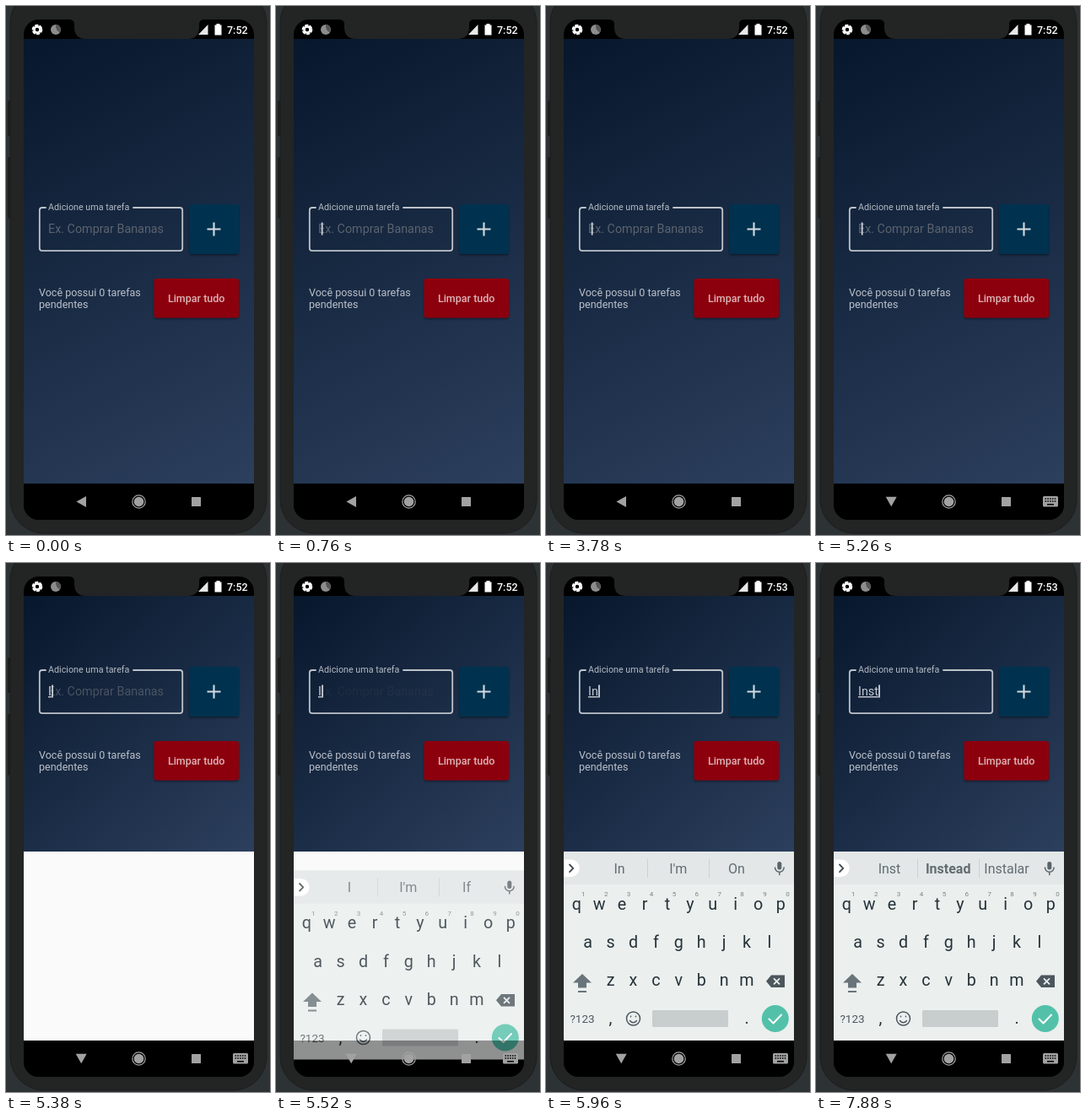
Write an HTML page that moves like this. It is 313 px wide and 627 px high and loops after 8 s.

```html
<!DOCTYPE html>
<html lang="pt">
<head>
<meta charset="utf-8">
<title>Lista de tarefas</title>
<style>
  html, body { margin: 0; width: 100%; height: 100%; overflow: hidden; background: #2d3234; }
  svg { display: block; width: 313px; height: 627px; font-family: Roboto, sans-serif; }
  .mid { text-anchor: middle; }
  .body { font-size: 12.54px; fill: #bbc0ca; }
  .field { font-size: 14.33px; }
  .key { font-size: 19.7px; fill: #253238; }
  .digit { font-size: 8px; fill: #78838a; }
  .suggestion { font-size: 16px; fill: #626c71; }
  .line { fill: none; stroke-linecap: round; stroke-linejoin: round; }
</style>
</head>
<body>
<svg viewBox="0 0 313 627">
  <defs>
    <linearGradient id="sky" gradientUnits="userSpaceOnUse" x1="21" y1="39" x2="294" y2="566">
      <stop stop-color="#07172c"/><stop offset="1" stop-color="#2c3f5d"/>
    </linearGradient>
    <clipPath id="screen"><rect x="21" y="16" width="273" height="593" rx="18"/></clipPath>
    <filter id="shadow" x="-10%" y="-10%" width="120%" height="130%">
      <feDropShadow dx="0" dy="1.5" stdDeviation="1.3" flood-opacity=".45"/>
    </filter>
  </defs>

  <!-- phone -->
  <g fill="#1d1f1f">
    <rect x="2" y="112" width="5" height="42" rx="2"/>
    <rect x="2" y="179" width="5" height="73" rx="2"/>
  </g>
  <rect x="5" y="-20" width="304" height="645" rx="40" fill="#232424" stroke="#1c1d1d"/>
  <rect x="21" y="16" width="273" height="593" rx="18"/>

  <g clip-path="url(#screen)">
    <rect x="21" y="39" width="273" height="527" fill="#fafafa"/>
    <rect id="page" x="21" y="39" width="273" height="527" fill="url(#sky)"/>

    <g id="form">
      <path class="line" d="M47 239H43a3.2 3.2 0 0 0-3.2 3.2V287a3.2 3.2 0 0 0 3.2 3.2H206a3.2 3.2 0 0 0 3.2-3.2V242.200a3.2 3.2 0 0 0-3.2-3.2H151" stroke="#bec3ca" stroke-width="1.8" stroke-linecap="butt"/>
      <text x="50" y="242" font-size="10.75" fill="#b6bbc4">Adicione uma tarefa</text>
      <text id="hint" class="field" x="50" y="269" fill="#5c636e">Ex. Comprar Bananas</text>
      <text id="typed" class="field" x="50" y="269" fill="#c4c9d1" text-decoration="underline"></text>
      <rect id="cursor" y="256.500" width="1.7" height="15" fill="#d5d9df"/>
      <rect x="217" y="235" width="59" height="59" rx="3" fill="#003350" filter="url(#shadow)"/>
      <path d="M238.500 264.500h16M246.500 256.500v16" stroke="#d3dae0" stroke-width="2.100"/>
      <text class="body" x="39" y="343.700">Você possui 0 tarefas</text>
      <text class="body" x="39" y="358.200">pendentes</text>
      <rect x="175.500" y="323" width="100.500" height="46.500" rx="3" fill="#8c000f" filter="url(#shadow)"/>
      <text class="body mid" x="225.700" y="351" font-weight="500" style="fill:#dcb4b9">Limpar tudo</text>
    </g>

    <rect x="21" y="566" width="273" height="43"/>

    <g id="keyboard">
      <rect x="21" y="342" width="273" height="224" fill="#ebefee"/>
      <rect x="21" y="342" width="273" height="39" fill="#e3e7e7"/>
      <path d="M120.500 351v22M193.500 351v22" stroke="#cbd1d2"/>
      <path d="M21 351.500h8.500a10.200 10.200 0 0 1 0 20.400H21z" fill="#fff"/>
      <path class="line" d="M28 357.500l4.200 4.300-4.200 4.300" stroke="#3c474c" stroke-width="1.800"/>
      <g id="suggestions"></g>
      <rect x="274.300" y="354" width="5" height="9.500" rx="2.500" fill="#59646a"/>
      <path class="line" d="M271.500 361a5.300 5.300 0 0 0 10.600 0M276.800 366.500v3" stroke="#59646a" stroke-width="1.500"/>
      <g id="keys"></g>
      <path d="M43 487l11 10.500h-6v6H38v-6h-6zM38 507h10v2H38z" fill="#68747a"/>
      <path d="M267 488.500h16v14.500h-16l-6-7.200z" fill="#4b575d"/>
      <path d="M270 492.300l7 7m0-7l-7 7" stroke="#ebefee" stroke-width="1.700"/>
      <text class="mid" x="43" y="545" font-size="13.500" fill="#4b575d">?123</text>
      <text class="key mid" x="76.500" y="546">,</text>
      <text class="key mid" x="238" y="546">.</text>
      <g class="line" stroke="#4b575d" stroke-width="1.500">
        <circle cx="103.500" cy="540" r="8"/>
        <path d="M99.500 542.500q4 4.500 8 0M100.500 537.300v.4M106.500 537.300v.4"/>
      </g>
      <rect x="126" y="530" width="90" height="20" rx="1.500" fill="#c8cdcd"/>
      <circle cx="271.800" cy="540" r="16" fill="#53c1aa"/>
      <path class="line" d="M264.500 540.500l5 5 9.500-10" stroke="#fff" stroke-width="2"/>
    </g>
    <rect x="21" y="566" width="273" height="43" opacity=".24"/>

    <!-- navigation bar -->
    <g fill="#a2a2a2">
      <path id="back" d="M83.500 587.500l11.500-6.500v13z"/>
      <circle cx="157.500" cy="587.500" r="5.800"/>
      <circle class="line" cx="157.500" cy="587.500" r="7.700" stroke="#a2a2a2" stroke-width="1.200"/>
      <rect x="220" y="582" width="11" height="11" rx=".6"/>
      <g id="switcher">
        <rect x="269" y="581" width="18" height="12.500" rx="1.500"/>
        <path d="M271.500 584h13M271.500 587h13" stroke="#000" stroke-width="1.500" stroke-dasharray="1.600 1.200"/>
        <path d="M274 590.700h8" stroke="#000" stroke-width="1.500"/>
      </g>
    </g>

    <!-- status bar -->
    <circle class="line" cx="37" cy="28" r="5.300" stroke="#fff" stroke-width="2" stroke-dasharray="2.700 2.850"/>
    <circle class="line" cx="37" cy="28" r="3.500" stroke="#fff" stroke-width="2.600"/>
    <circle cx="59" cy="28" r="6" fill="#8d8d8d"/>
    <path d="M59 22a6 6 0 0 1 5 9.300q-5.500-2-5-9.300z" fill="#555"/>
    <path d="M239.500 22v12H228z" fill="#e8e8e8"/>
    <path d="M247.500 22.500h2V21h4v1.500h2V34.500h-8z" fill="#fff"/>
    <text id="clock" x="262" y="32.700" font-size="12.540" font-weight="500" fill="#fff"></text>
  </g>
  <path d="M76 15h158v1q-5 1-5 5v4q0 14-14 14H95q-14 0-14-14v-4q0-4-5-5z" fill="#232424"/>
</svg>

<script>
const LOOP = 8000;
const RESIZE = 5380;
const SVG_NS = 'http://www.w3.org/2000/svg';
const $ = id => document.getElementById(id);

const clockSteps = [[0, '7:52'], [5840, '7:53']];
const typedSteps = [[0, ''], [RESIZE, 'I'], [5900, 'In'], [7140, 'Ins'], [7880, 'Inst']];
const suggestionSteps = [
  [0, ['I', "I'm", 'If']],
  [5940, ['In', "I'm", 'On']],
  [7160, ['Ins', 'Inside', 'Instant']],
  [7720, ['Inst', 'Instead', 'Instalar']]
];
const cursorSteps = [[0, 0], [760, 1], [2340, 0], [3780, 1], [4500, 0], [5220, 1]];
const hintSteps = [[0, 1], [RESIZE, .75], [5420, .55], [5470, .35], [5520, .15], [5540, .08], [5680, 0]];
const backSteps = [[0, 0], [5220, -45], [5260, -90]];
const switcherSteps = [[0, 0], [5220, .5], [5260, 1]];
const liftSteps = [[0, 60], [5420, 42], [5470, 31], [5520, 22.5], [5540, 13], [5680, 7], [5720, 3], [5760, 0]];
const fadeSteps = [[0, 0], [5400, .12], [5420, .35], [5470, .6], [5520, .8], [5540, .9], [5680, .96], [5720, 1]];

// Value of the last step that has begun.
function at(steps, t) {
  let value = steps[0][1];
  for (const [start, next] of steps) if (t >= start) value = next;
  return value;
}

function addText(parent, className, x, y, content = '') {
  const node = document.createElementNS(SVG_NS, 'text');
  node.setAttribute('class', className + ' mid');
  node.setAttribute('x', x);
  node.setAttribute('y', y);
  node.textContent = content;
  parent.append(node);
  return node;
}

const rows = [['qwertyuiop', 36.3, 410.7], ['asdfghjkl', 49.7, 456], ['zxcvbnm', 76.6, 501.3]];
for (const [letters, left, y] of rows)
  [...letters].forEach((letter, i) => addText($('keys'), 'key', left + i * 26.9, y, letter));
for (let i = 0; i < 10; i++)
  addText($('keys'), 'digit', 44.3 + i * 26.9, 395, (i + 1) % 10);

const slots = [87, 156.700, 226].map(x => addText($('suggestions'), 'suggestion', x, 367.700));

function setText(node, content) {
  if (node.textContent !== content) node.textContent = content;
}

function render(t) {
  const resized = t >= RESIZE;
  const bottom = resized ? 342 : 566;
  $('page').setAttribute('height', bottom - 39);
  $('sky').setAttribute('y2', bottom);
  $('form').setAttribute('transform', `translate(0 ${resized ? -112 : 0})`);

  setText($('clock'), at(clockSteps, t));
  const typed = at(typedSteps, t);
  setText($('typed'), typed);
  const width = typed ? $('typed').getComputedTextLength() : 0;
  $('cursor').setAttribute('x', 50.3 + Math.max(width, 3.5));
  $('cursor').setAttribute('opacity', at(cursorSteps, t));
  $('hint').setAttribute('opacity', at(hintSteps, t));

  $('back').setAttribute('transform', `rotate(${at(backSteps, t)} 89.2 587.5)`);
  $('switcher').setAttribute('opacity', at(switcherSteps, t));

  $('keyboard').setAttribute('transform', `translate(0 ${at(liftSteps, t)})`);
  $('keyboard').setAttribute('opacity', at(fadeSteps, t));
  const words = at(suggestionSteps, t);
  slots.forEach((slot, i) => setText(slot, words[i]));
  slots[1].setAttribute('font-weight', words[1] === 'Instead' ? 700 : 400);
}

const begin = performance.now();
function tick() {
  render((performance.now() - begin) % LOOP);
  requestAnimationFrame(tick);
}
tick();
</script>
</body>
</html>
```
